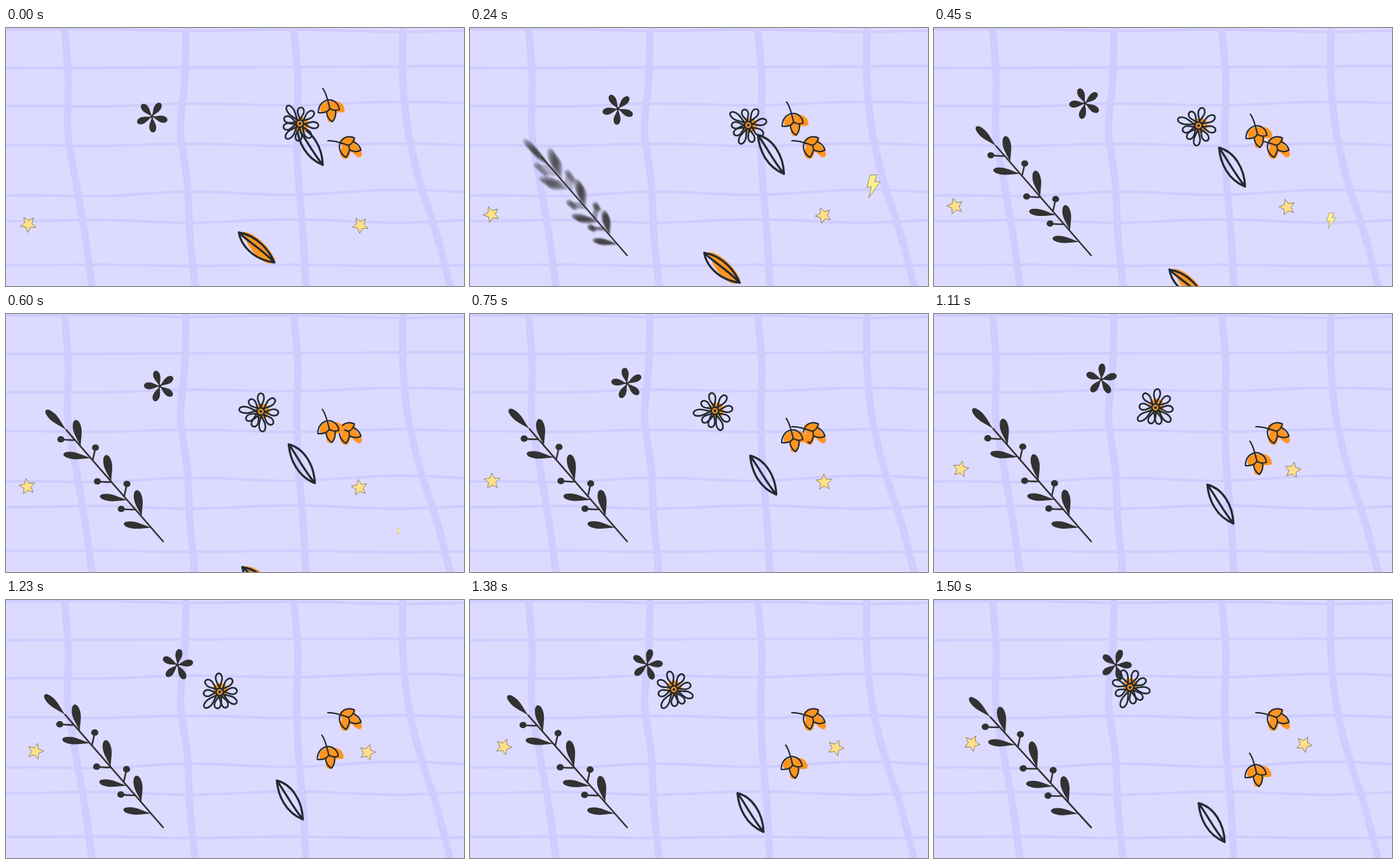
An HTML page that plays this animation: 720 by 405 pixels, repeating every 1.53 s.

```html
<!DOCTYPE html>
<html lang="en">
<head>
<meta charset="utf-8">
<title>Drifting flowers</title>
<style>
html, body { margin: 0; width: 100%; height: 100%; overflow: hidden; background: #dcdaff; }
svg { display: block; width: 100vw; height: 100vh; }
.ink { fill: none; stroke: #222b33; stroke-width: 2.6; stroke-linecap: round; stroke-linejoin: round; }
.bold { stroke-width: 3.3; }
.fine { stroke-width: 2.2; }
.orange { fill: #ff941f; }
.dark { fill: #323232; }
.twig { fill: none; stroke: #323232; stroke-width: 2.6; stroke-linecap: round; }
.thin { stroke: #77705e; stroke-width: .8; stroke-linejoin: round; }
.grid { fill: none; stroke: #cfccff; }
</style>
</head>
<body>
<svg viewBox="0 0 720 405">
  <defs>
    <filter id="blur" x="-20%" y="-20%" width="140%" height="140%">
      <feGaussianBlur id="soft" stdDeviation="0"/>
    </filter>
    <path id="sprigLines" class="ink fine" d="M0 0C5 6 8 18 11 31M8 18C-2 20 -7 28 -7 38C2 39 9 36 11 31M8 18C18 17 25 24 26 33C20 35 14 34 11 31M6 36C6 44 10 49 15 52C20 47 21 42 20 34"/>
    <path id="starShape" class="thin" fill="#ffdf8a"/>
    <g id="leaves"></g>
  </defs>
  <g id="grid" class="grid"></g>
  <g id="branch">
    <g id="ghosts"></g>
    <path id="stem" class="twig" d="M0 0L-154 -177"/>
  </g>
  <g id="blossom" class="dark"></g>
  <g id="fullLeaf">
    <path class="orange" d="M6 -1C20 -3 48 20 57 43C57 50 46 50 40 46C23 37 12 16 6 -1Z"/>
    <path class="ink bold" d="M0 0C3 18 20 42 56 47C48 29 30 5 0 0C15 15 30 21 56 47"/>
  </g>
  <g id="openLeaf">
    <path class="ink bold" d="M0 0C2 24 14 50 41 61C40 32 24 6 0 0C13 18 24 40 41 61"/>
  </g>
  <g id="daisy"></g>
  <g transform="translate(506 177)">
    <path class="orange" d="M19 0C22 -7 36 -8 42 -4C44 -1 42 3 46 8C54 14 56 24 50 26C44 26 40 18 36 17C34 24 32 30 26 28C18 26 18 18 22 10Z"/>
    <use href="#sprigLines" transform="rotate(-58)"/>
  </g>
  <g id="sprig">
    <path class="orange" d="M-4 32C-4 24 4 20 9 20L20 20C30 20 36 30 34 36C30 39 26 36 22 38C20 44 20 50 16 52C8 55 5 50 8 40L5 38C0 40 -4 38 -4 32Z"/>
    <use href="#sprigLines"/>
  </g>
  <use id="star1" href="#starShape"/>
  <use id="star2" href="#starShape"/>
  <path id="bolt" class="thin" fill="#fdf18c" d="M-5 -17L6 -18L2 -7L11 -7L-7 18L-3 1L-10 2Z"/>
</svg>
<script>
const LOOP = 1530, STEP = 30, W = 720, H = 405;
const $ = id => document.getElementById(id);
const clamp = v => Math.max(0, Math.min(1, v));
const ramp = (t, a, b) => clamp((t - a) / (b - a));
const cosDeg = a => Math.cos(a * Math.PI / 180);

function add(parent, tag, attrs) {
  const el = document.createElementNS('http://www.w3.org/2000/svg', tag);
  for (const k in attrs) el.setAttribute(k, attrs[k]);
  return parent.appendChild(el);
}

// Smooth curve through a few points.
function curve(p) {
  let d = `M${p[0]}`;
  for (let i = 0; i < p.length - 1; i++) {
    const a = p[Math.max(0, i - 1)], b = p[i], c = p[i + 1], e = p[Math.min(p.length - 1, i + 2)];
    d += `C${b[0] + (c[0] - a[0]) / 6} ${b[1] + (c[1] - a[1]) / 6} ${c[0] - (e[0] - b[0]) / 6} ${c[1] - (e[1] - b[1]) / 6} ${c}`;
  }
  return d;
}

// Club-shaped petal pointing along +x.
const petal = (len, w) =>
  `M0 0C${.35 * len} ${-.55 * w} ${.6 * len} ${-1.75 * w} ${.92 * len} ${-.8 * w}` +
  `Q${1.08 * len} 0 ${.92 * len} ${.8 * w}C${.6 * len} ${1.75 * w} ${.35 * len} ${.55 * w} 0 0Z`;

// Grid: columns by key points, rows by left end, right end and wave
function buildGrid() {
  const columns = [
    [92, 98, 97, 110, 124, 135], [283, 281, 274.5, 285, 289, 297],
    [452, 459, 457, 460, 467, 471], [624, 624, 632, 651, 677, 698]
  ];
  for (const c of columns)
    add($('grid'), 'path', { d: curve(c.map((x, i) => [x, i * H / 5])), 'stroke-width': 11.5 });
  const rows = [
    [2, 5, -.7], [63, 60, 0], [123, 117, 1], [184, 183, 1],
    [263, 256, 1.6], [303, 303, -1.3], [372, 373, -.5]
  ];
  for (const [left, right, wave] of rows) {
    const pts = [];
    for (let x = 0; x <= W; x += 40)
      pts.push([x, left + (right - left) * x / W + 2 * wave * Math.min(1, x / 200) * Math.cos((x - 450) / 52)]);
    add($('grid'), 'path', { d: curve(pts), 'stroke-width': 4 });
  }
}

// Branch, measured from its foot
const foot = [247, 357];
const onStem = x => [x - foot[0], 1.15 * (x - foot[0])];

function leaf([x, y], turn, len, w) {
  add($('leaves'), 'path', { class: 'dark', d: petal(len, w), transform: `translate(${x} ${y}) rotate(${turn})` });
}

function berry([x, y], dx, dy) {
  add($('leaves'), 'path', { class: 'twig', d: `M${x} ${y}q${dx / 2} ${dy / 2 + 1} ${dx} ${dy}` });
  add($('leaves'), 'ellipse', { class: 'dark', cx: x + dx, cy: y + dy, rx: 5.6, ry: 5.1 });
}

function buildBranch() {
  leaf(onStem(93), 224, 45, 5.2);
  for (let i = 0; i < 3; i++) {
    const x = 107 + 68 * i - 10 * i * i;
    leaf(onStem(116 + 48.5 * i), -101, 43, 5.8);
    leaf(onStem(x + 25), 188, 44, 4.8);
    berry(onStem(x), -22.5, -1);
    if (i < 2) berry(onStem(135 + 50 * i), 4.5, -20);
  }
  for (let k = 0; k < 7; k++) add($('ghosts'), 'use', { href: '#leaves' });
}

function buildFlowers() {
  for (let i = 0; i < 5; i++)
    add($('blossom'), 'path', { d: petal(25, 4.7), transform: `rotate(${i * 72 - 90})` });
  add($('blossom'), 'circle', { r: 2.5 });

  const daisy = $('daisy');
  add(daisy, 'ellipse', { class: 'orange', cx: 2, cy: -1.5, rx: 11.5, ry: 12 });
  for (let i = 0; i < 9; i++) {
    const turn = 40 * i - 19.5 + 11 * cosDeg(40 * (i - 3));
    const reach = 30 + .8 * i * cosDeg(120 * (i - 4));
    add(daisy, 'path', { class: 'ink', d: petal(reach - 8, 4.4), transform: `rotate(${turn - 90}) translate(6.5 0)` });
  }
  add(daisy, 'circle', { class: 'ink orange', r: 5.8, style: 'fill:#ff941f' });
  add(daisy, 'circle', { r: 2.2, fill: '#222b33' });
}

function buildStar() {
  let d = '';
  for (let i = 0; i < 10; i++) {
    const a = i * Math.PI / 5, r = i % 2 ? 6 : 13;
    d += `${i ? 'L' : 'M'}${(r * Math.sin(a)).toFixed(2)} ${(-r * Math.cos(a)).toFixed(2)}`;
  }
  $('starShape').setAttribute('d', d + 'Z');
}

function place(id, x, y, turn = 0, scale = 1) {
  $(id).setAttribute('transform', `translate(${x} ${y}) rotate(${turn}) scale(${scale})`);
}

// The branch grows from its foot; faint smaller copies smear the leaves until it settles.
function drawBranch(t) {
  const grow = 1 - .52 * Math.exp(-6.8 * (t - .03));
  const smear = 1 - ramp(t, .18, .4);
  place('branch', ...foot, -1.4 * ramp(t, 1.23, 1.5) ** 2, grow);
  $('branch').style.display = t > .03 ? '' : 'none';
  $('stem').setAttribute('opacity', ramp(t, .03, .18));
  $('soft').setAttribute('stdDeviation', (1.6 * smear).toFixed(2));
  if (smear) $('ghosts').setAttribute('filter', 'url(#blur)');
  else $('ghosts').removeAttribute('filter');
  const faint = 1 - .83 * smear ** .4;
  [...$('ghosts').children].forEach((el, k) => {
    el.setAttribute('transform', `scale(${1 - .024 * k * smear})`);
    el.setAttribute('opacity', smear || !k ? faint * ramp(t, .03, .2) : 0);
  });
}

// t in seconds
function draw(t) {
  const spin = 39 * t;
  place('blossom', 229.5 + 9 * t + 19.1 * t * t, 139 - 55.3 * t + 20.4 * t * t, spin - 40);
  place('daisy', 462 - 102.5 * t, 150 + 14 * t - 15.1 * t * t, 74 - 81 * t);
  place('openLeaf', 457 - 16.7 * t - 7.1 * t * t, 154 + 133 * t - 35 * (1 - Math.exp(-3 * t)));
  place('fullLeaf', 366 + 9 * t, 321 + 137 * t - 17 * t * t);
  place('sprig', 498 - 1.3 * t, 95 + 87 * t + 6.7 * t * t);

  const x = 35 - 6 * t + 10 * t ** 3, y = 308 - 66 * t + 7.1 * t * t;
  place('star1', x, y, spin - 32);
  place('star2', x + 522, y + 1.6, spin - 32);

  const size = Math.min(ramp(t, .03, .24), 1 - ramp(t, .24, .69) ** 1.6);
  place('bolt', 645 - 46 * t, 186 + 259 * t, 0, size);
  $('bolt').style.display = size > 0 ? '' : 'none';
  drawBranch(t);
}

buildGrid();
buildBranch();
buildFlowers();
buildStar();

const start = performance.now();
function tick() {
  const t = (performance.now() - start) % LOOP;
  draw(Math.floor(t / STEP) * STEP / 1000);
  requestAnimationFrame(tick);
}
tick();
</script>
</body>
</html>
```
